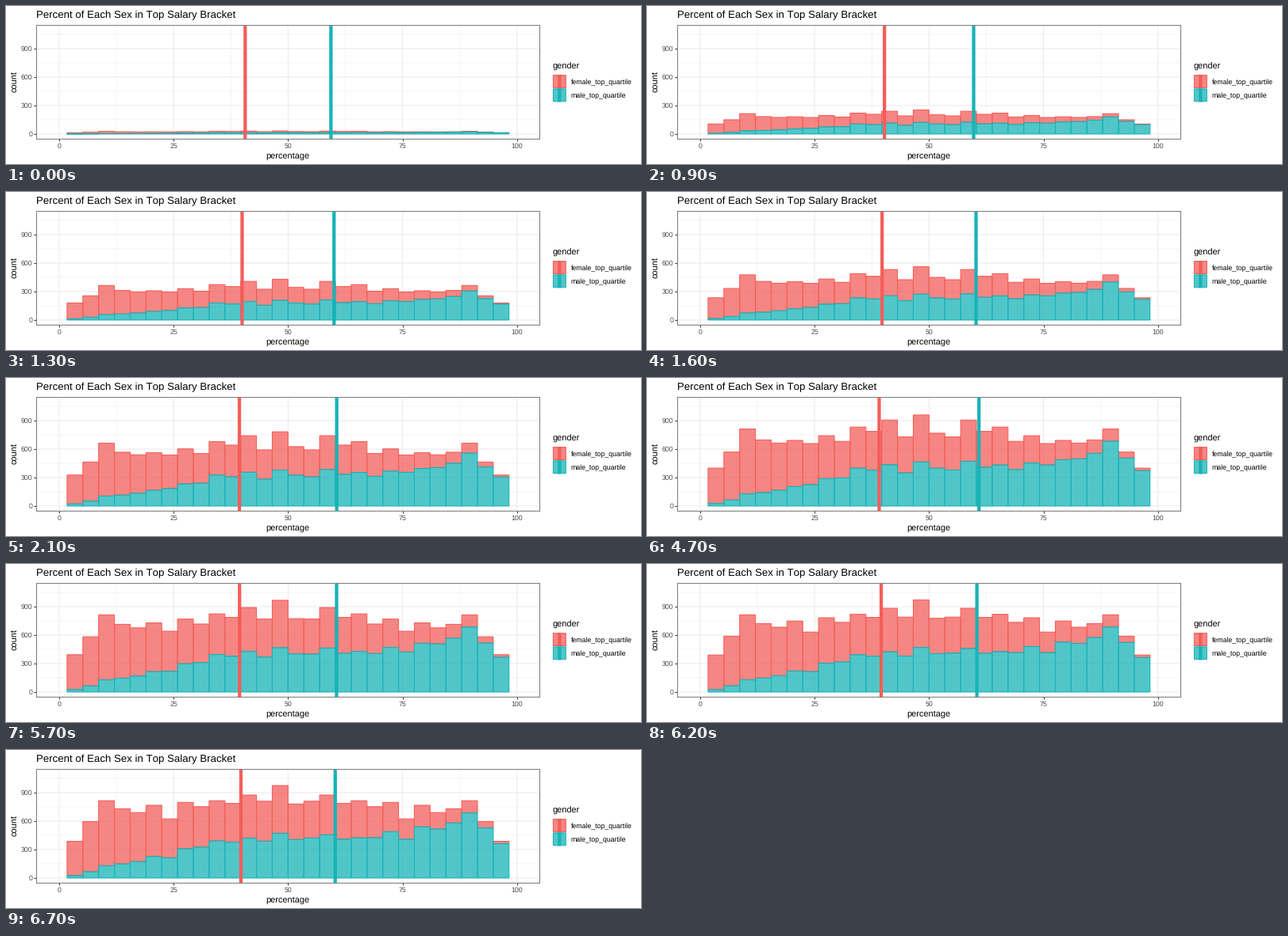
These frames come from a looping animation (800x200 px, 8 s). A matplotlib script:

```python
import numpy as np
import matplotlib.pyplot as plt
from matplotlib.animation import FuncAnimation
from matplotlib.patches import Rectangle

W, H, DPI = 800, 200, 100
PX = 72 / DPI  # points per pixel
FRAMES, INTERVAL, STEPS = 80, 100, 21
RED, TEAL = "#F35E5A", "#17B3B7"
THIN, THICK = 1.07 * PX, 4.27 * PX
ALPHA = 0.75

plt.rcParams.update({
    "font.family": "Liberation Sans",
    "text.hinting": "none",
    "text.kerning_factor": 6,  # unkerned text
})

# Both sexes together, bins 1 to 14; bins 15 to 28 mirror them.
BEFORE = np.array([400, 568, 812, 695, 662, 688, 660,
                   738, 678, 833, 787, 908, 725, 767])
AFTER = np.array([387, 595, 815, 730, 690, 767, 623,
                  797, 752, 815, 787, 875, 810, 780])
START = 0.034 * BEFORE
SHARE = np.minimum(0.48, 0.02 + 0.046 * np.arange(1, 15))  # male part
TIES = 0.125   # exact 50/50 splits, all counted left of the middle
SPREAD = np.array([9.37, 10.93, 10.3])  # distance of each mean from 50

BIN = 100 / 29
LEFTS = BIN * (np.arange(28) + 0.5)


def state(i):
    """Male counts, female counts and mean offset at frame i."""
    a = np.clip((i - 4) / STEPS, 0, 1)
    b = np.clip((i - 46) / STEPS, 0, 1)
    mix = np.array([1 - a, a - b, b])
    total = mix @ [START, BEFORE, AFTER]
    male = np.concatenate([total * SHARE, (total * (1 - SHARE))[::-1]])
    female = male[::-1].copy()
    male[13] += TIES * total[-1]
    female[13] += TIES * total[-1]
    return male, female, mix @ SPREAD


fig = plt.figure(figsize=(W / DPI, H / DPI), dpi=DPI, facecolor="white")


def label(x, y, text, size, color="black", va="baseline", **kw):
    fig.text(x / W, 1 - y / H, text, fontsize=size * PX, color=color,
             va=va, **kw)


# Panel, placed so that 0..100 and 0..900 fall on the pixel scale below
X0, XS = 67.0, 5.767
Y0, YS = 162.0, 0.12
LEFT, RIGHT, TOP, BOTTOM = 38.4, 672.4, 23.5, 168.3

ax = fig.add_axes([LEFT / W, 1 - BOTTOM / H, (RIGHT - LEFT) / W,
                   (BOTTOM - TOP) / H])
ax.set_xlim((LEFT - X0) / XS, (RIGHT - X0) / XS)
ax.set_ylim((Y0 - BOTTOM) / YS, (Y0 - TOP) / YS)
ax.set_xticks(range(0, 101, 25))
ax.set_yticks(range(0, 901, 300))
ax.set_xticks(np.arange(12.5, 100, 25), minor=True)
ax.set_yticks(range(150, 1051, 300), minor=True)
ax.set_axisbelow(True)
ax.grid(which="major", color="#EBEBEB", lw=THIN, snap=False)
ax.grid(which="minor", color="#EBEBEB", lw=THIN / 2, snap=False)
ax.tick_params(which="major", length=2.75 * PX, width=THIN, color="#333333",
               labelbottom=False, labelleft=False)
ax.tick_params(which="minor", length=0)
for spine in ax.spines.values():
    spine.set(linewidth=THIN, edgecolor="#7F7F7F", zorder=5)


def box(x, y, w, h, color, **kw):
    return Rectangle((x, y), w, h, facecolor=(color, ALPHA), edgecolor=color,
                     lw=THIN, snap=False, **kw)


def bars(color, z):
    return [ax.add_patch(box(x, 0, BIN, 0, color, zorder=z)) for x in LEFTS]


female_bars = bars(RED, 2)
male_bars = bars(TEAL, 3)
female_line = ax.axvline(50, color=RED, lw=THICK, zorder=4, snap=False)
male_line = ax.axvline(50, color=TEAL, lw=THICK, zorder=4, snap=False)

# Text
label(38, 15, "Percent of Each Sex in Top Salary Bracket", 13.2)
label(355.3, 193, "percentage", 11, ha="center")
label(15.5, 96, "count", 11, va="center", ha="right", rotation=90)
for v in range(0, 101, 25):
    label(X0 + XS * v, 180, str(v), 8.8, "#4D4D4D", ha="center")
for v in range(0, 901, 300):
    label(33.3, Y0 - YS * v + 3.2, str(v), 8.8, "#4D4D4D", ha="right")

# Legend
KEY, INSET = 17.28, 0.71
KEY_X, KEY_Y = 688.7, 86.9
label(KEY_X, 80, "gender", 11)
legend = fig.add_axes([0, 0, 1, 1])
legend.set(xlim=(0, W), ylim=(H, 0))
legend.axis("off")
for n, (name, color) in enumerate([("female_top_quartile", RED),
                                   ("male_top_quartile", TEAL)]):
    y = KEY_Y + n * KEY
    side = KEY - 2 * INSET
    legend.add_patch(box(KEY_X + INSET, y + INSET, side, side, color))
    legend.plot([KEY_X + KEY / 2] * 2, [y, y + KEY], color=color, lw=THICK,
                solid_capstyle="butt", snap=False)
    label(711.5, y + KEY / 2 + 3.2, name, 8.8)


def draw(i):
    male, female, spread = state(i)
    for fb, mb, f, m in zip(female_bars, male_bars, female, male):
        mb.set_height(m)
        fb.set_y(m)
        fb.set_height(f)
    female_line.set_xdata([50 - spread] * 2)
    male_line.set_xdata([50 + spread] * 2)
    return [*female_bars, *male_bars, female_line, male_line]


anim = FuncAnimation(fig, draw, frames=FRAMES, interval=INTERVAL,
                     init_func=lambda: draw(0), repeat=True, repeat_delay=0,
                     blit=False)
plt.show()
```
